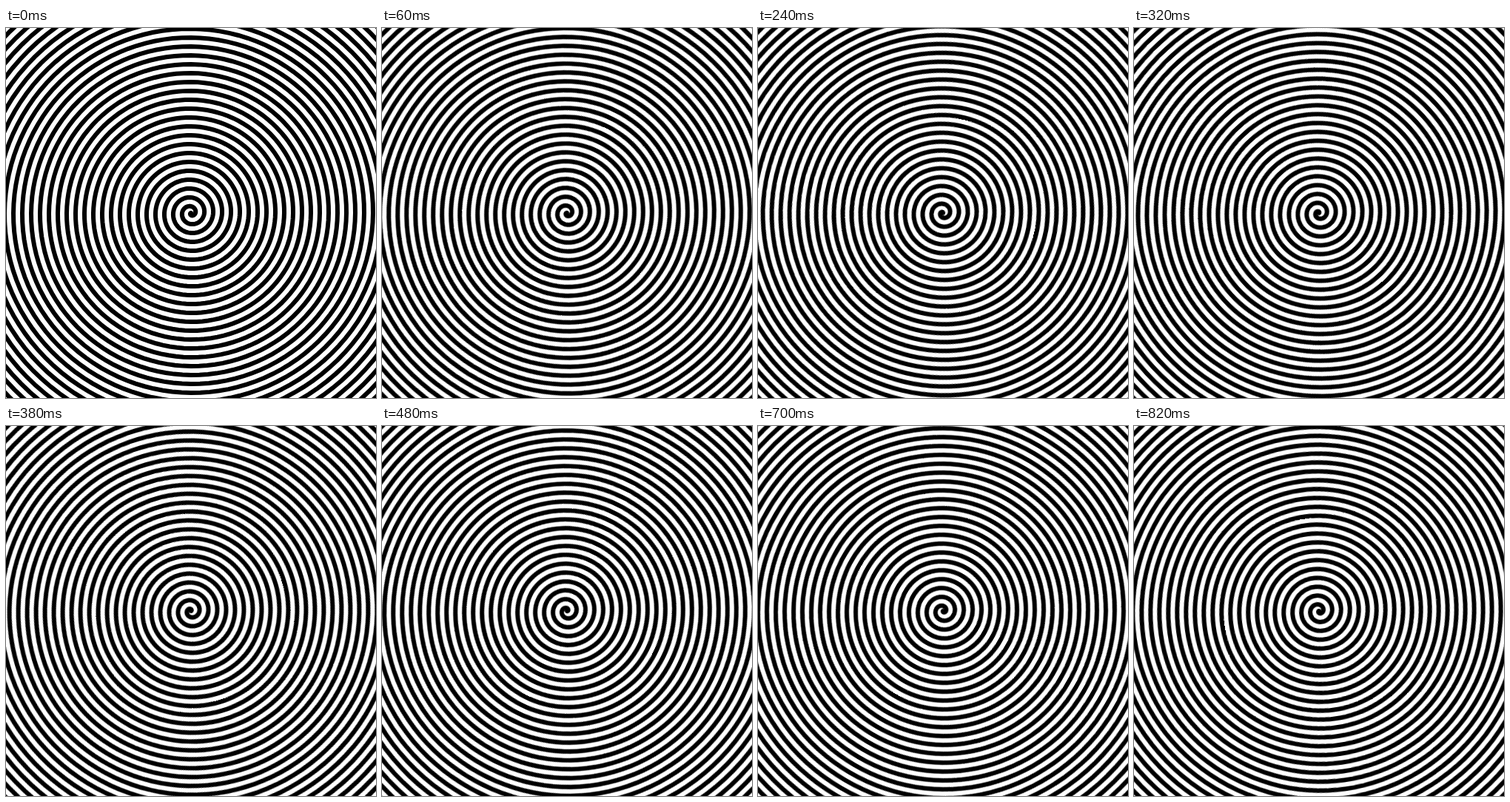
These frames come from a looping animation (500x500 px, 0.84 s). An HTML page:

```html
<!DOCTYPE html>
<html lang="en">
<head>
<meta charset="utf-8">
<title>Turning spiral</title>
<style>
  html, body { margin: 0; width: 100%; height: 100%; overflow: hidden; background: #fff; }
  svg { display: block; width: 500px; height: 500px; }
  #arm {
    fill: none;
    stroke: #000;
    stroke-width: 6;
    stroke-linecap: round;
    animation: turn 840ms steps(42) infinite;
  }
  @keyframes turn { to { transform: rotate(360deg); } }
</style>
</head>
<body>
<svg viewBox="-250 -250 500 500"><path id="arm"/></svg>
<script>
  const PITCH = 12, TURNS = 31, STEPS = 120;

  // The arm starts on the left and winds outwards anticlockwise.
  const points = Array.from({ length: TURNS * STEPS + 1 }, (_, i) => {
    const turn = i / STEPS;
    const angle = Math.PI - turn * 2 * Math.PI;
    const r = PITCH * turn;
    return (r * Math.cos(angle)).toFixed(2) + ' ' + (r * Math.sin(angle)).toFixed(2);
  });
  document.getElementById('arm').setAttribute('d', 'M' + points.join('L'));
</script>
</body>
</html>
```
